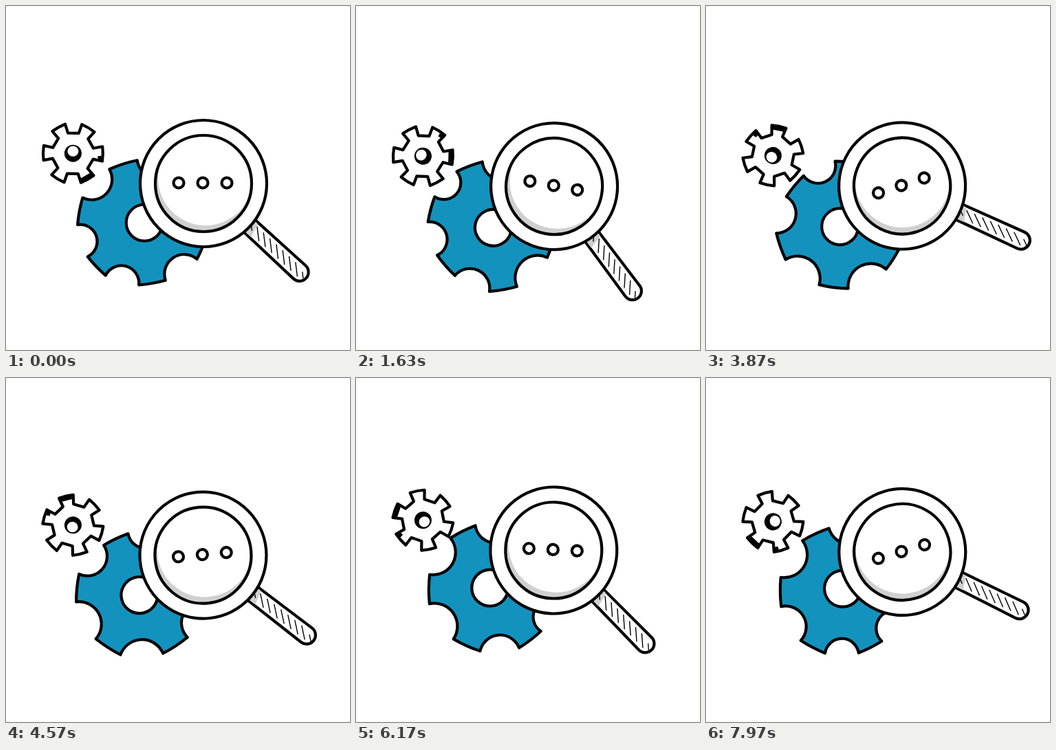
An HTML page that plays this animation: 500 by 500 pixels, repeating every 8 s.

```html
<!DOCTYPE html>
<html lang="en">
<head>
<meta charset="utf-8">
<title>Gears and magnifier</title>
<style>
  html, body { margin: 0; width: 100%; height: 100%; overflow: hidden; background: #fff; }
  svg { display: block; width: 100%; height: 100%; }
</style>
</head>
<body>
<svg viewBox="0 0 500 500" fill="#fff" stroke="#000" stroke-width="4.2" stroke-linejoin="round">
  <defs>
    <clipPath id="lensClip"><circle cx="287" cy="258" r="70"/></clipPath>
  </defs>
  <g id="scene">
    <g id="big">
      <path id="bigBody" fill="#1492be"/>
      <circle cx="3.7" r="26.5"/>
    </g>
    <g id="small">
      <path id="smallBody"/>
      <path id="smallShade" fill="none" stroke-width="7.5"/>
      <circle r="12.5" fill="#000" stroke="none"/>
      <ellipse cy="-3" rx="8" ry="7.6" stroke="none"/>
    </g>
    <g id="glass">
      <g transform="translate(287 258) rotate(42.7)">
        <path d="M88-12L190-13A13 13 0 0 1 190 13L88 12Z"/>
        <path d="M90-10.5L98-10.5L104 10.5L90 10.5Z" fill="#d0d0d0" stroke="none"/>
      </g>
      <path id="hatch" fill="none" stroke-width="1.4"/>
      <circle cx="287" cy="258" r="92"/>
      <circle cx="287" cy="258" r="70" fill="#d0d0d0" stroke="none"/>
      <circle cx="290" cy="250" r="69" stroke="none" clip-path="url(#lensClip)"/>
      <circle cx="287" cy="258" r="70" fill="none"/>
      <circle cx="251" cy="257" r="7.5"/>
      <circle cx="286" cy="257" r="7.5"/>
      <circle cx="321" cy="257" r="7.5"/>
    </g>
  </g>
</svg>
<script>
const $ = id => document.getElementById(id);
const LOOP = 8000, TURN = 36 / 1000; // degrees per ms

const polar = (r, deg) => {
  const a = deg * Math.PI / 180;
  return [r * Math.cos(a), r * Math.sin(a)];
};
const fmt = p => p.map(v => v.toFixed(2)).join(' ');

// Flat, slightly uneven teeth [angle, radius, half width] with round notches.
function bigGear() {
  const teeth = [[21.2, 96, 12.2], [80.2, 90.5, 12.5], [136.2, 93, 11.7],
                 [190.5, 93.5, 12.3], [252.2, 91, 13.5], [318.2, 93, 13.2]];
  const sag = 21;
  let d = '';
  teeth.forEach(([a, r, w], i) => {
    const [b, q, v] = teeth[(i + 1) % teeth.length];
    const start = polar(r, a - w), end = polar(r, a + w), next = polar(q, b - v);
    const chord = Math.hypot(next[0] - end[0], next[1] - end[1]);
    const notch = (chord * chord / 4 + sag * sag) / (2 * sag);
    d += `${i ? 'L' : 'M'}${fmt(start)}A200 200 0 0 1 ${fmt(end)}`;
    d += `A${notch} ${notch} 0 0 0 ${fmt(next)}`;
  });
  return d + 'Z';
}

function smallGear() {
  let d = '';
  for (let a = 1; a < 360; a += 60) {
    d += `${a > 1 ? 'L' : 'M'}${fmt(polar(30.5, a - 15))}L${fmt(polar(44, a - 14))}`;
    d += `A80 80 0 0 1 ${fmt(polar(44, a + 14))}L${fmt(polar(30.5, a + 15))}`;
  }
  return d + 'Z';
}

function hatchLines() {
  let d = '';
  for (let i = 0; i < 9; i++) {
    const x = 357 + i * 9.3, y = 258 + (x - 287) * 0.923;
    const len = i === 0 ? 4 : i === 8 ? 5 : 10.5;
    d += `M${x - len / 8} ${y - len}L${x + len / 8} ${y + len}`;
  }
  return d;
}

$('bigBody').setAttribute('d', bigGear());
$('smallBody').setAttribute('d', smallGear());
$('smallShade').setAttribute('d',
  `M${fmt(polar(37, 12))}L${fmt(polar(42, 10))}M${fmt(polar(41.5, 49))}L${fmt(polar(41.5, 72))}`);
$('hatch').setAttribute('d', hatchLines());

// Eased value between [time, value] keys.
function keyed(keys, t) {
  let i = 0;
  while (i < keys.length - 2 && t >= keys[i + 1][0]) i++;
  const [t0, v0] = keys[i], [t1, v1] = keys[i + 1];
  return v0 + (v1 - v0) * (1 - Math.cos(Math.PI * (t - t0) / (t1 - t0))) / 2;
}

const BOB = [[0, 0], [2700, 6], [6650, -8], [10000, 0]];
const SWING = [[0, 0], [1890, 11], [3740, -18.5], [5500, 11], [7400, -18.5], [10000, 0]];

function draw(t) {
  const place = (id, value) => $(id).setAttribute('transform', value);
  place('scene', `translate(0 ${keyed(BOB, t)})`);
  place('big', `translate(197.5 315) rotate(${t * TURN})`);
  place('small', `translate(97.4 214.2) rotate(${-t * TURN})`);
  place('glass', `rotate(${keyed(SWING, t)} 287 264)`);
}

const began = performance.now();
function tick() {
  draw((performance.now() - began) % LOOP);
  requestAnimationFrame(tick);
}
draw(0);
requestAnimationFrame(tick);
</script>
</body>
</html>
```
